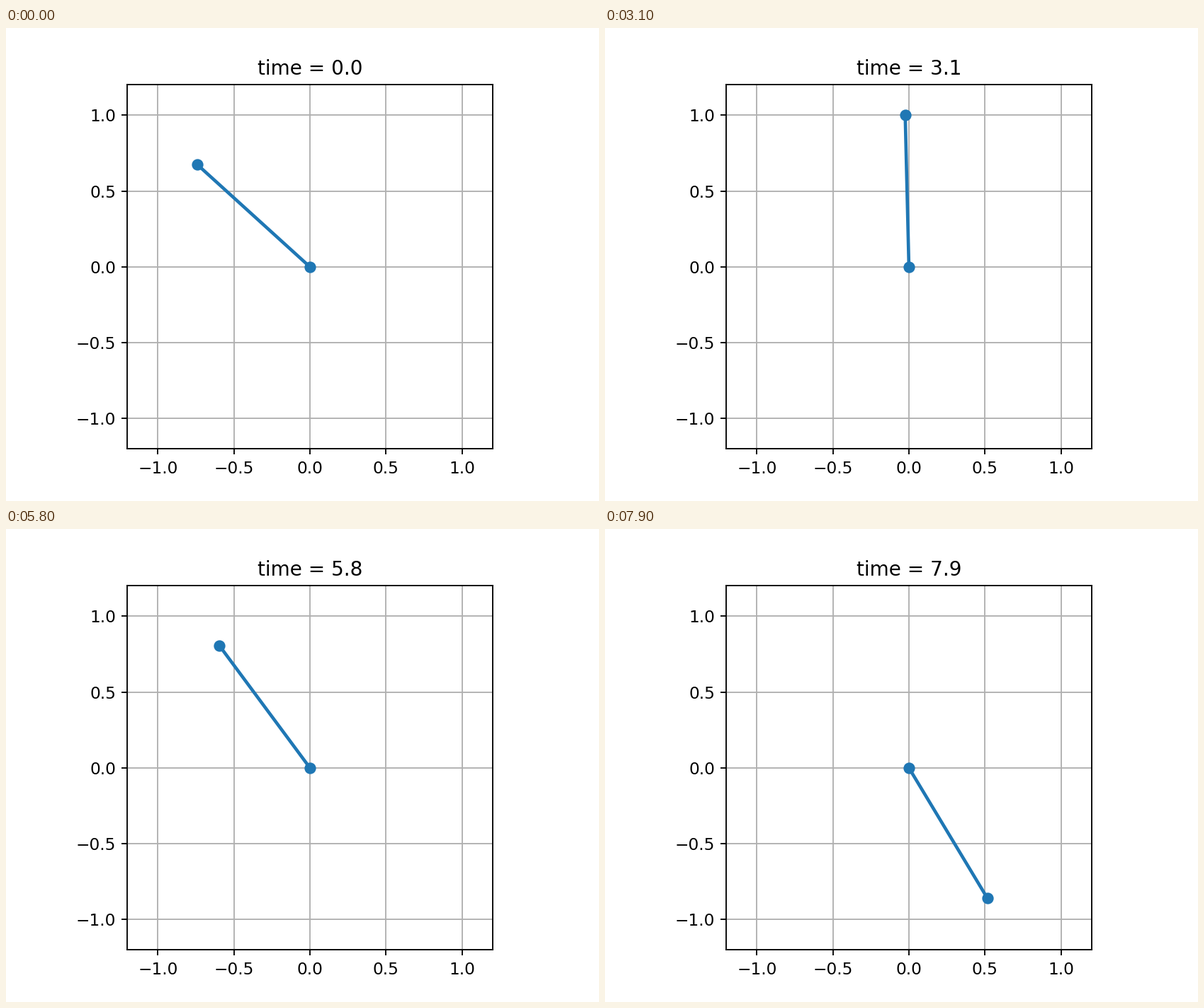
Recreate the animation shown at these times as a matplotlib script. Size 837x669 px, loop 8000 ms.

```python
import numpy as np
import matplotlib.pyplot as plt
from matplotlib.animation import FuncAnimation

WIDTH, HEIGHT, DPI = 837, 669, 167.4
FRAMES, STEP_MS = 80, 100
GRAVITY = 9.8 * 0.1 ** 2   # per squared step
DRAG = 0.7                 # per step

# A few poses the rod passes: step -> angle from straight down, degrees
POSES = {0: -132.3, 9: 42.5, 16: 272, 19: 406.1, 24: 611.7, 31: 901.4,
         39: 1225.4, 51: 1713.2, 59: 2060.8, 65: 2313.7, 79: 2911}


def swing(poses, n, weight=30):
    """Angles of a motor-driven pendulum through the poses, with the
    smoothest motor torque."""
    keys = list(poses)
    goal = np.radians(list(poses.values()))
    unit = np.eye(n)
    accel = unit[2:] - 2 * unit[1:-1] + unit[:-2]
    speed = (unit[2:] - unit[:-2]) / 2
    motion = accel + DRAG * speed
    change = np.diff(np.eye(n - 2), axis=0)

    angle = np.interp(np.arange(n), keys, goal)
    for _ in range(20):
        inner = angle[1:-1]
        torque = motion @ angle + GRAVITY * np.sin(inner)
        slope = motion + GRAVITY * np.cos(inner)[:, None] * unit[1:-1]
        lhs = np.vstack([change @ slope, weight * unit[keys]])
        rhs = np.concatenate([change @ torque, weight * (angle[keys] - goal)])
        angle = angle - np.linalg.lstsq(lhs, rhs, rcond=None)[0]
    return angle


angles = swing(POSES, FRAMES)

fig, ax = plt.subplots(figsize=(WIDTH / DPI + 1e-6, HEIGHT / DPI + 1e-6), dpi=DPI)
ax.set(xlim=(-1.2, 1.2), ylim=(-1.2, 1.2), aspect="equal")
ticks = np.arange(-1, 1.1, 0.5)
ax.set_xticks(ticks)
ax.set_yticks(ticks)
ax.grid()
rod, = ax.plot([], [], "o-", color="tab:blue", lw=2)
title = ax.set_title("time = 0.0")


def update(i):
    a = angles[i]
    rod.set_data([0, np.sin(a)], [0, -np.cos(a)])
    title.set_text(f"time = {i * STEP_MS / 1000:.1f}")
    return rod, title


anim = FuncAnimation(fig, update, frames=FRAMES, interval=STEP_MS,
                     repeat=True, repeat_delay=0, blit=False)
plt.show()
```
